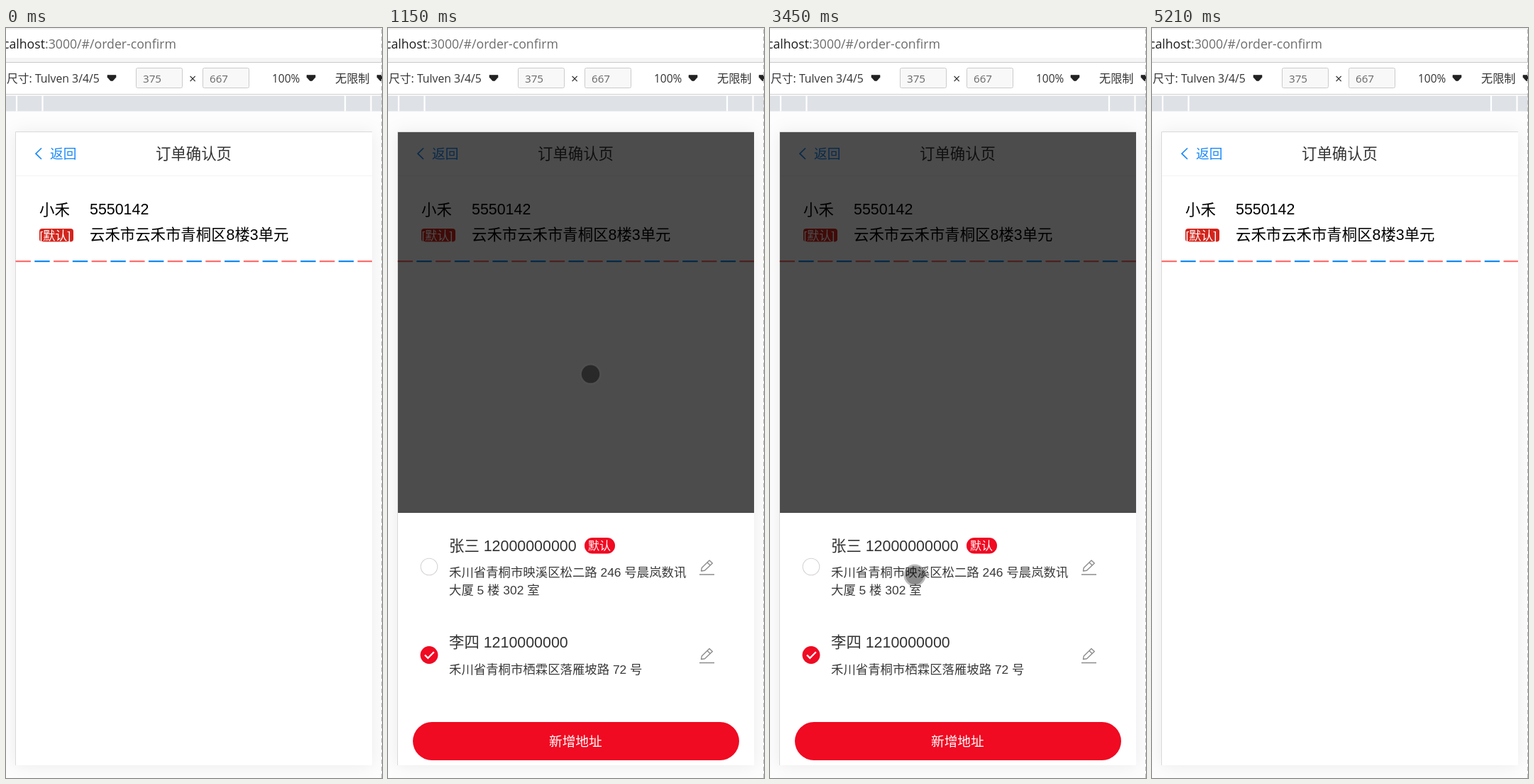
An HTML page for the animation above (5.74 s loop, 530 px wide and 1058 px high).

```html
<!DOCTYPE html>
<html lang="zh-CN">
<head>
<meta charset="utf-8">
<title>订单确认页</title>
<style>
  html, body { margin: 0; width: 100%; height: 100%; overflow: hidden; background: #fdfdfd; }
  svg { display: block; width: 530px; height: 1058px; }
  text { font-family: "Liberation Sans", "Noto Sans CJK SC", "Noto Sans CJK", sans-serif; white-space: pre; }
  .ui { font-family: "Open Sans", "Noto Sans CJK SC", "Noto Sans CJK", sans-serif; }
  .card { filter: drop-shadow(0 1px 12px rgba(0, 0, 0, .07)); }
</style>
</head>
<body>
<svg id="stage" viewBox="0 0 530 1058" xmlns="http://www.w3.org/2000/svg">
  <defs>
    <clipPath id="screen"><rect x="14" y="147" width="502" height="893"/></clipPath>
  </defs>

  <g id="browser">
    <rect width="530" height="118" fill="#fff"/>
    <rect width="530" height="2" fill="#f1f1f1"/>
    <rect y="42" width="530" height="6" fill="#f5f5f5"/>
    <rect y="48" width="530" height="1" fill="#c9c9c9"/>
    <rect y="93" width="530" height="1" fill="#cfcfcf"/>
    <rect y="95.500" width="530" height="22" fill="#dee1e6"/>
    <path d="M15 95.500v22M51.500 95.500v22M478 95.500v22M514.500 95.500v22" stroke="#fff" stroke-width="2.200"/>
    <text class="ui" x="-4" y="29" font-size="17.700" fill="#6d6d6d"><tspan fill="#1c1c1c">calhost</tspan>:3000/#/order-confirm</text>
  </g>

  <g class="card"><rect x="13" y="146" width="503" height="894" fill="#fff"/></g>
  <path d="M13.500 1040V146.500H516" fill="none" stroke="#d9d9d9"/>

  <g id="page">
    <rect x="14" y="208" width="502" height="1" fill="#f3f3f4"/>
    <path d="M50 169.500L42 177.200L50 185" fill="none" stroke="#1989fa" stroke-width="1.700"/>
  </g>
  <rect id="mask" x="14" y="147" width="502" height="893"/>
  <g clip-path="url(#screen)"><g id="sheet"></g></g>

  <path d="M529.500 2V1058" stroke="#b9b9b9" stroke-dasharray="6 4"/>
  <g id="cursor">
    <circle r="14" fill="none" stroke="#565656" stroke-opacity=".4" stroke-width="3"/>
    <circle r="12.700" fill="#000" fill-opacity=".45"/>
  </g>
</svg>
<script>
const LOOP = 5740, STEP = 67.5;
const SHEET_TOP = 684, SHEET_HEIGHT = 356, MASK_ALPHA = 0.7;
const RED = '#f00a22', INK = '#333';
const byId = id => document.getElementById(id);

function add(parent, tag, attrs, content) {
  const node = document.createElementNS('http://www.w3.org/2000/svg', tag);
  for (const key in attrs) node.setAttribute(key, attrs[key]);
  if (content) node.textContent = content;
  parent.appendChild(node);
  return node;
}
const label = (parent, x, y, size, fill, content, cls = '') =>
  add(parent, 'text', { x, y, 'font-size': size, fill, class: cls }, content);
const box = (parent, x, y, width, height, rx, fill, extra = {}) =>
  add(parent, 'rect', { x, y, width, height, rx, fill, ...extra });

function buildToolbar() {
  const bar = byId('browser');
  const arrow = x => add(bar, 'path', {
    d: `M${x} 66.500h12v3l-4.500 5h-3l-4.500 -5z`, fill: '#222', stroke: '#222', 'stroke-linejoin': 'round', 'stroke-width': 0.6
  });
  const field = (x, value) => {
    box(bar, x + 0.5, 56.5, 65, 28, 2, '#f8f8f8', { stroke: '#cbcbcb' });
    label(bar, x + 10, 77, 15.2, '#666', value, 'ui');
  };
  label(bar, 1, 77, 15.8, INK, '尺寸: Tulven 3/4/5', 'ui');
  arrow(143);
  field(183, '375');
  label(bar, 258, 78, 18, INK, '×', 'ui');
  field(277, '667');
  label(bar, 375, 77, 15.5, INK, '100%', 'ui');
  arrow(424);
  label(bar, 464, 77, 16.2, INK, '无限制', 'ui');
  arrow(523);
}

function buildPage() {
  const page = byId('page');
  label(page, 62, 184, 18.7, '#1989fa', '返回');
  label(page, 211, 185, 21.4, '#323233', '订单确认页');
  label(page, 47, 263.5, 21.4, '#000', '小禾');
  label(page, 118, 263, 21.4, '#000', '5550142');
  label(page, 118, 299, 21.4, '#000', '云禾市云禾市青桐区8楼3单元');
  box(page, 47, 283, 48, 18.5, 4, '#d3251c');
  label(page, 47.5, 298.5, 17.1, '#fff', '[默认]');
  for (let i = 0; i < 19; i++) {
    const x = 13.5 + i * 26.78;
    box(page, x, 328, Math.min(21.4, 516 - x), 2.2, 0, i % 2 ? '#1089f0' : '#ff6c6c');
  }
}

function addressRow(parent, name, nameY, lines, lineY, midY) {
  label(parent, 86, nameY, 21.4, INK, name);
  lines.forEach((line, i) => label(parent, 86, lineY + i * 24.5, 17.4, '#3a3a3a', line));
  const icon = { fill: 'none', stroke: '#8c8c8c', 'stroke-width': 1.4, 'stroke-linejoin': 'round' };
  add(parent, 'path', {
    ...icon, transform: `translate(449.5 ${midY})`,
    d: 'M-8 6L-7.200 1.500L3.500 -9L7.800 -5L-3 5.300ZM0.500 -6L4.800 -2M-10.500 11H10.500'
  });
  add(parent, 'circle', { cx: 58, cy: midY, r: 11.8, fill: '#fff', stroke: '#d6d2d4', 'stroke-width': 1.1 });
  const tick = add(parent, 'g', { transform: `translate(58 ${midY})` });
  add(tick, 'circle', { r: 12.4, fill: RED });
  add(tick, 'path', { d: 'M-6 0L-1.700 4.300L6.800 -4.200', fill: 'none', stroke: '#fff', 'stroke-width': 2.3 });
  return tick;
}

function buildSheet() {
  const sheet = byId('sheet');
  box(sheet, 13.5, 0, 503, SHEET_HEIGHT, 0, '#fff');
  const ticks = [
    addressRow(sheet, '张三 12000000000', 53.7, ['禾川省青桐市映溪区松二路 246 号晨岚数讯', '大厦 5 楼 302 室'], 90, 76),
    addressRow(sheet, '李四 1210000000', 189.7, ['禾川省青桐市栖霖区落雁坡路 72 号'], 226.5, 200.5)
  ];
  box(sheet, 277, 35, 43, 22.5, 11, RED);
  label(sheet, 282, 52, 16, '#fff', '默认');
  box(sheet, 35, 295, 460, 54, 27, RED);
  label(sheet, 227, 329, 18.7, '#fff', '新增地址');
  return ticks;
}

const ramp = (t, start, length) => Math.min(1, Math.max(0, (t - start) / length));
const smooth = u => u * u * (3 - 2 * u);

// cubic-bezier(.42, 0, 1, 1), solved by bisection
function easeIn(x) {
  let low = 0, high = 1;
  for (let i = 0; i < 24; i++) {
    const s = (low + high) / 2;
    if (1.26 * (1 - s) * (1 - s) * s + smooth(s) < x) low = s; else high = s;
  }
  return smooth((low + high) / 2);
}
const easeOut = x => 1 - easeIn(1 - x);

const CURSOR_PATH = [
  [67, 478, 913], [600, 298, 300], [1000, 298, 300], [1420, 254, 964], [1500, 254, 964],
  [1900, 169, 770], [2150, 169, 770], [2640, 206, 890], [3060, 206, 890], [3430, 204, 772],
  [3680, 204, 772], [4050, 218, 608.5], [4865, 218, 608.5], [5130, 371, 1012]
];

function cursorAt(t) {
  const next = CURSOR_PATH.findIndex(key => key[0] > t);
  if (next < 1) return CURSOR_PATH[next ? CURSOR_PATH.length - 1 : 0].slice(1);
  const [t0, x0, y0] = CURSOR_PATH[next - 1], [t1, x1, y1] = CURSOR_PATH[next];
  const u = smooth((t - t0) / (t1 - t0));
  return [x0 + (x1 - x0) * u, y0 + (y1 - y0) * u];
}

buildToolbar();
buildPage();
const ticks = buildSheet();

function render(time) {
  const t = Math.floor(time / STEP + 0.1) * STEP;

  const closed = easeIn(ramp(t, 4535, 302.6));
  const raised = easeOut(ramp(t, 844.5, 300)) - closed;
  const dimmed = easeOut(ramp(t, 834, 300)) - closed;
  byId('sheet').setAttribute('transform', `translate(0 ${Math.round(SHEET_TOP + SHEET_HEIGHT * (1 - raised))})`);
  byId('mask').setAttribute('opacity', MASK_ALPHA * dimmed);

  const first = ramp(t, 1925, 190) - ramp(t, 2870, 190) + ramp(t, 3480, 190);
  ticks[0].setAttribute('opacity', first);
  ticks[1].setAttribute('opacity', 1 - first);

  const [x, y] = cursorAt(t);
  byId('cursor').setAttribute('transform', `translate(${x} ${y})`);
  byId('cursor').setAttribute('visibility', t > 60 && t < 5190 ? 'visible' : 'hidden');
}

const began = performance.now();
function tick() {
  render((performance.now() - began) % LOOP);
  requestAnimationFrame(tick);
}
tick();
</script>
</body>
</html>
```
